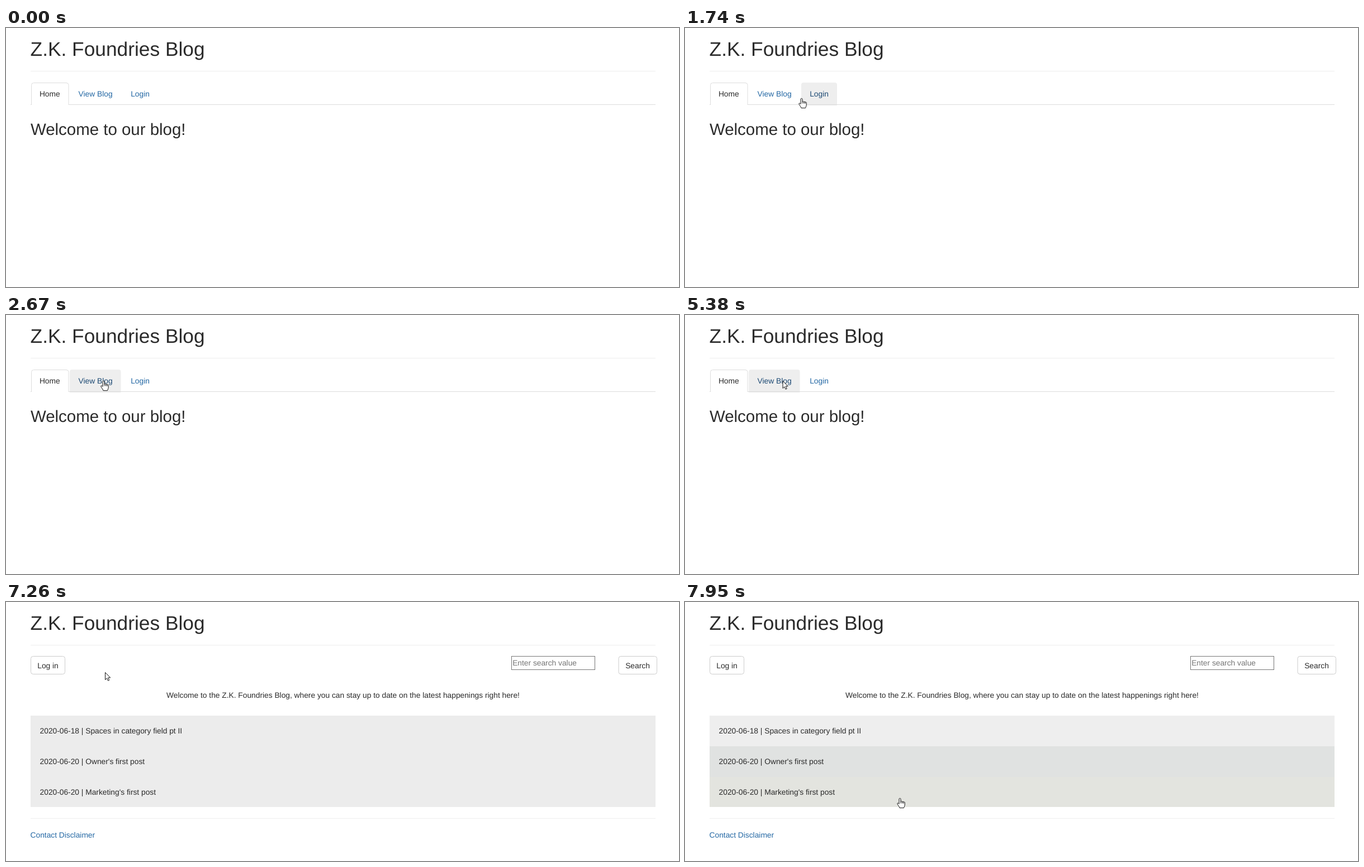
Animation of 1204x465 px, one loop 8000 ms. Source, as an HTML page:

```html
<!DOCTYPE html>
<html lang="en">
<head>
<meta charset="utf-8">
<title>Company blog</title>
<style>
  html, body { margin: 0; width: 100%; height: 100%; overflow: hidden; background: #fff; }
  svg { display: block; width: 1204px; height: 465px; }
  text {
    font: 13.78px "Liberation Sans", Arial, sans-serif;
    fill: #2b2b2b;
    text-rendering: geometricPrecision;
    white-space: pre;
  }
  .h1 { font-size: 35.3px; }
  .h2 { font-size: 29.45px; }
  .mid { text-anchor: middle; }
  .link { fill: #2468a4; }
  .hover .link { fill: #1d4a74; }
  .tab path, .tab rect { fill: none; }
  .tab.hover path { fill: #eee; }
  .tab.hover rect { fill: #ddd; }
  .hint { fill: #757575; }
  .button { fill: #fff; stroke: #ccc; }
  .pointer { fill: #fff; stroke: #111; stroke-linejoin: round; }
</style>
</head>
<body>
<svg viewBox="0 0 1204 465">
  <text class="h1" x="43.6" y="50">Z.K. Foundries Blog</text>
  <rect x="44" y="77" width="1118" height="1" fill="#eee"/>

  <g id="home">
    <rect x="44" y="137" width="1118" height="1" fill="#ddd"/>
    <path d="M45.5 138V102.5q0-4 4-4H108q4 0 4 4V138" fill="#fff" stroke="#ddd"/>
    <text x="59.9" y="123">Home</text>
    <g class="tab" id="viewTab">
      <path d="M114 138V102q0-4 4-4H201.5q4 0 4 4V138z"/>
      <rect x="114" y="137" width="91.5" height="1.6"/>
      <text class="link" x="129.6" y="123">View Blog</text>
    </g>
    <g class="tab" id="loginTab">
      <path d="M208 138V102q0-4 4-4H268q4 0 4 4V138z"/>
      <rect x="208" y="137" width="64" height="1.6"/>
      <text class="link" x="223.2" y="123">Login</text>
    </g>
    <text class="h2" x="43.9" y="192">Welcome to our blog!</text>
  </g>

  <g id="blog">
    <rect class="button" x="44.5" y="97.5" width="61" height="32" rx="4"/>
    <text class="mid" x="75" y="118.5">Log in</text>
    <rect x="904.5" y="97.5" width="149" height="24" fill="#fff" stroke="#767676"/>
    <text class="hint" x="906.2" y="113.7">Enter search value</text>
    <rect class="button" x="1096" y="97.5" width="68.5" height="32" rx="4"/>
    <text class="mid" x="1130" y="118.5">Search</text>
    <text class="mid" x="603" y="171.7">Welcome to the Z.K. Foundries Blog, where you can stay up to date on the latest happenings right here!</text>
    <g id="rows"></g>
    <rect x="44" y="388" width="1118" height="1" fill="#eee"/>
    <text class="link" x="43.6" y="422.7">Contact Disclaimer</text>
  </g>

  <path id="arrow" class="pointer" d="M.5 .5V13.6L3.5 10.8L5.5 15.3L7.7 14.3L5.7 9.9H9.7z"/>
  <g id="hand" class="pointer">
    <path d="M-1.5 1.3Q0-.6 1.5 1.3V6Q3.2 5 4 6.5Q5.7 5.7 6.4 7Q8 6.3 8.7 7.8V12C8.7 14.5 7.5 15.5 7 17.7H-.5C-1 15.5-3.4 13-4.6 10.5Q-4.9 8.5-3 9L-1.5 10.5z"/>
    <path d="M1.5 6V9.5M4 6.5V9.5M6.4 7V10" fill="none"/>
  </g>
  <circle id="click" cx="174" cy="117.6" r="11.8" fill="#ff0" fill-opacity=".47"/>
</svg>
<script>
  const LOOP = 8000;
  const PAGE_CHANGE = 5470;
  const ROW_TOP = 204, ROW_HEIGHT = 54.8;
  const ROW_COLOR = '#ececec';
  const posts = [
    { text: '2020-06-18 | Spaces in category field pt II', hover: '#e2e3e1', left: '#eeeeee' },
    { text: "2020-06-20 | Owner's first post", hover: '#e0e2e1', left: '#e0e2e1' },
    { text: "2020-06-20 | Marketing's first post", hover: '#e3e4df', left: '#e3e4df' }
  ];
  // The pointer is sampled in discrete steps during each move.
  const moves = [
    { start: 340, end: 500, steps: 3, from: [677, 450], to: [557, 408] },
    { start: 900, end: 1660, steps: 11, from: [550, 402], to: [227, 133] },
    { start: 1740, end: 2050, steps: 5, from: [208.5, 126], to: [174.5, 118] },
    { start: 7260, end: 7950, steps: 10, from: [177, 126], to: [384.5, 352] }
  ];

  const $ = id => document.getElementById(id);
  const show = (id, on) => { $(id).style.display = on ? '' : 'none'; };
  const smooth = p => p * p * (3 - 2 * p);

  function add(name, attrs) {
    const el = document.createElementNS($('rows').namespaceURI, name);
    for (const key in attrs) el.setAttribute(key, attrs[key]);
    return $('rows').appendChild(el);
  }

  posts.forEach((post, i) => {
    const top = Math.round(ROW_TOP + i * ROW_HEIGHT);
    const bottom = Math.round(ROW_TOP + (i + 1) * ROW_HEIGHT);
    post.box = add('rect', { x: 44, y: top, width: 1118, height: bottom - top });
    add('text', { x: 60.6, y: 236 + i * 55 }).textContent = post.text;
  });

  function pointerAt(t) {
    const move = moves.filter(m => t >= m.start).pop();
    if (!move) return null;
    const last = move.steps - 1;
    const step = Math.floor((t - move.start) / (move.end - move.start) * last + 1e-6);
    const p = smooth(Math.min(step, last) / last);
    return move.from.map((v, i) => v + (move.to[i] - v) * p);
  }

  function draw(t) {
    const pos = pointerAt(t);
    const [x, y] = pos || [-99, -99];
    const onBlog = t >= PAGE_CHANGE;
    const onTabs = !onBlog && y >= 98 && y < 138;
    const row = onBlog ? Math.floor((y - ROW_TOP) / ROW_HEIGHT) : -1;
    const overView = onTabs && x >= 113 && x < 206;
    const overLogin = onTabs && x >= 208 && x < 272;
    const loading = t >= 5380 && t < PAGE_CHANGE;
    const hand = (overView || overLogin || row >= 0) && !loading;

    show('home', !onBlog);
    show('blog', onBlog);
    $('viewTab').classList.toggle('hover', overView);
    $('loginTab').classList.toggle('hover', overLogin);
    posts.forEach((post, i) => {
      const color = i === row ? post.hover : i < row ? post.left : ROW_COLOR;
      post.box.setAttribute('fill', color);
    });

    show('arrow', pos && !hand);
    show('hand', pos && hand);
    $(hand ? 'hand' : 'arrow').setAttribute('transform', `translate(${x} ${y})`);
    show('click', t >= 2430 && t < 2670);
  }

  const begin = performance.now();
  function tick() {
    draw((performance.now() - begin) % LOOP);
    requestAnimationFrame(tick);
  }
  tick();
</script>
</body>
</html>
```
